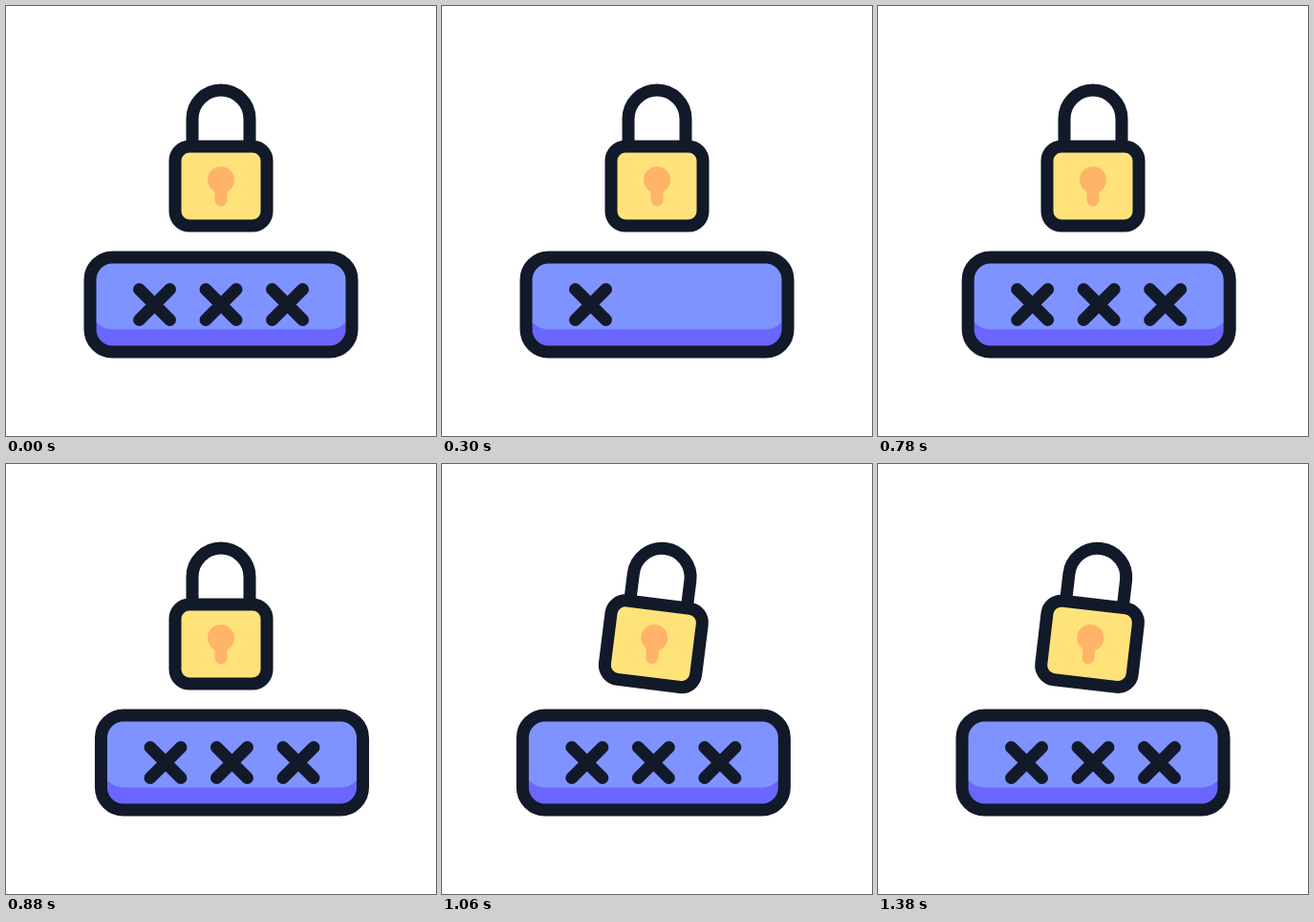
An HTML page for the animation above (1400 ms loop, 450x450 px).

```html
<!DOCTYPE html>
<html lang="en">
<head>
<meta charset="utf-8">
<title>Password lock</title>
<style>
  html, body { margin: 0; height: 100%; overflow: hidden; background: #fff; }
  svg { display: block; width: 100vw; height: 100vh; }
  .line { fill: none; stroke: #121929; stroke-width: 13; stroke-linecap: round; }
</style>
</head>
<body>
<svg viewBox="0 0 450 450">
  <g id="lock">
    <path class="line" d="M195 147V118a30 30 0 0 1 60 0V147"/>
    <rect x="177" y="147" width="96" height="83" rx="15" fill="#ffe37a"/>
    <circle cx="225" cy="182" r="14" fill="#ffb469"/>
    <path d="M225 182v21" stroke="#ffb469" stroke-width="13" stroke-linecap="round"/>
    <rect class="line" x="177" y="147" width="96" height="83" rx="15"/>
  </g>
  <g id="bar">
    <rect x="88" y="263" width="274" height="99" rx="23.5" fill="#6a66ff"/>
    <rect x="88" y="263" width="274" height="75.5" rx="23.5" fill="#7e93ff"/>
    <rect class="line" x="88" y="263" width="274" height="99" rx="23.5"/>
    <path class="line cross" d="M139.5 296.5l32 32m0-32l-32 32"/>
    <path class="line cross" d="M209 296.5l32 32m0-32l-32 32"/>
    <path class="line cross" d="M278.5 296.5l32 32m0-32l-32 32"/>
  </g>
</svg>
<script>
const LOOP = 1400;
const lock = document.getElementById('lock');
const bar = document.getElementById('bar');
const crosses = document.querySelectorAll('.cross');

// Keys are [time, value] pairs, eased in and out between neighbours.
const SHAKE = [[740, 0], [840, 17.5], [990, -17], [1090, 0]];
const SWING = [[930, 0], [1030, 9], [1180, -9], [1330, 9], [1480, 0]];
const FADE = [[92, 1], [204, 0]];

function track(keys, t) {
  if (t <= keys[0][0]) return keys[0][1];
  for (let i = 1; i < keys.length; i++) {
    const [t0, a] = keys[i - 1], [t1, b] = keys[i];
    if (t < t1) {
      const p = (t - t0) / (t1 - t0);
      return a + (b - a) * p * p * (3 - 2 * p);
    }
  }
  return keys[keys.length - 1][1];
}

const start = performance.now();

function draw() {
  const now = Math.max(0, performance.now() - start) % LOOP;
  const t = Math.floor(now / 20) * 20;   // 50 steps per second
  bar.setAttribute('transform', `translate(${track(SHAKE, t)} 0)`);
  lock.setAttribute('transform', `rotate(${track(SWING, t)} 225 159)`);
  crosses.forEach((cross, i) => {
    cross.setAttribute('opacity', t >= 300 + 200 * i ? 1 : track(FADE, t));
  });
  requestAnimationFrame(draw);
}
draw();
</script>
</body>
</html>
```
